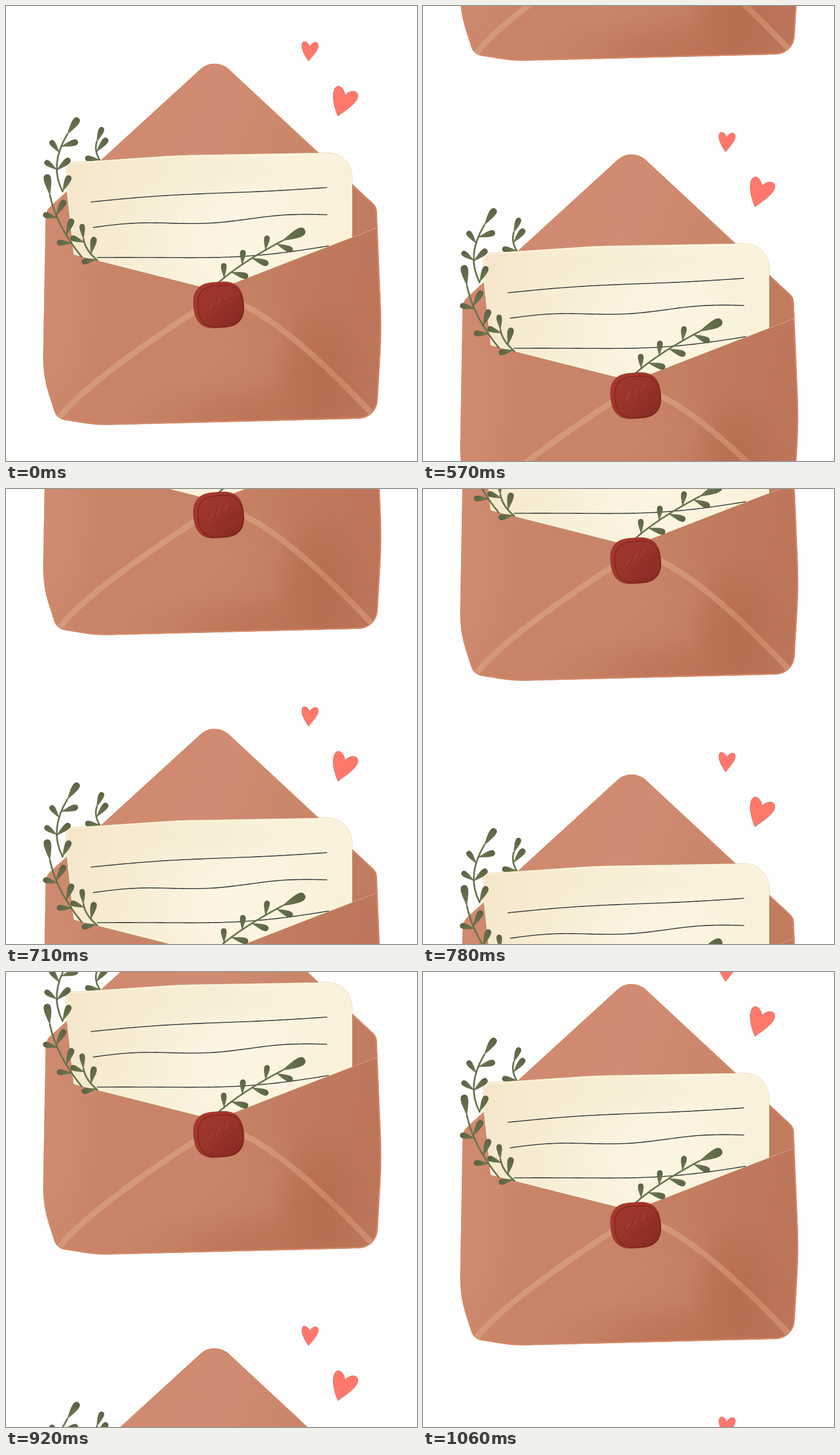
An HTML page with a canvas that plays this animation: 711 px wide and 787 px high, repeating every 1.13 s.

```html
<!DOCTYPE html>
<html lang="en">
<head>
<meta charset="utf-8">
<title>Love letter</title>
<style>
html, body { margin: 0; width: 100%; height: 100%; overflow: hidden; background: #fefefe; }
canvas { display: block; }
</style>
</head>
<body>
<canvas id="stage" width="711" height="787"></canvas>
<script>
const W = 711, H = 787, TAU = Math.PI * 2;
const HOLD = 500, STEP = 70, STEPS = 10;
const LOOP = HOLD + STEP * (STEPS - 1);

const stage = document.getElementById('stage').getContext('2d');
const art = document.createElement('canvas');
art.width = W;
art.height = H;
const g = art.getContext('2d');

function stroke(path, color, width) {
  g.strokeStyle = color;
  g.lineWidth = width;
  g.stroke(path);
}

function fill(path, color) {
  g.fillStyle = color;
  g.fill(path);
}

function clipped(path, draw) {
  g.save();
  g.clip(path);
  draw();
  g.restore();
}

function linear(x0, y0, x1, y1, ...colors) {
  const grad = g.createLinearGradient(x0, y0, x1, y1);
  colors.forEach((c, i) => grad.addColorStop(i / (colors.length - 1), c));
  return grad;
}

// Soft elliptical patch of colour; rgb is "r,g,b".
function glow(x, y, rx, ry, rgb, alpha) {
  g.save();
  g.translate(x, y);
  g.scale(rx, ry);
  const grad = g.createRadialGradient(0, 0, 0, 0, 0, 1);
  grad.addColorStop(0, `rgba(${rgb},${alpha})`);
  grad.addColorStop(0.5, `rgba(${rgb},${alpha * 0.6})`);
  grad.addColorStop(1, `rgba(${rgb},0)`);
  g.fillStyle = grad;
  g.fillRect(-1, -1, 2, 2);
  g.restore();
}

// Closed polygon whose [x, y, radius] corners are rounded.
function rounded(...corners) {
  const path = new Path2D();
  const [first, last] = [corners[0], corners.at(-1)];
  path.moveTo((first[0] + last[0]) / 2, (first[1] + last[1]) / 2);
  corners.forEach(([x, y, r = 0], i) => {
    const next = corners[(i + 1) % corners.length];
    path.arcTo(x, y, next[0], next[1], r);
  });
  path.closePath();
  return path;
}

function bend(x0, y0, cx, cy, x1, y1) {
  const path = new Path2D();
  path.moveTo(x0, y0);
  path.quadraticCurveTo(cx, cy, x1, y1);
  return path;
}

// Path sampled from a function of 0..1 that returns [x, y].
function plot(point, samples = 60) {
  const path = new Path2D();
  for (let i = 0; i <= samples; i++) path.lineTo(...point(i / samples));
  return path;
}

function heart(x, y, scale, tilt) {
  const shape = new Path2D();
  shape.bezierCurveTo(0, 0, 0, 0, 0, 0);
  shape.moveTo(0, 0);
  shape.bezierCurveTo(4, -9, 15, -11, 15, -1);
  shape.bezierCurveTo(15, 7, 4, 20, 0, 26);
  shape.bezierCurveTo(-4, 22, -14, 9, -14, -1);
  shape.bezierCurveTo(-14, -11, -4, -9, 0, 0);
  g.save();
  g.translate(x, y);
  g.rotate(tilt);
  g.scale(scale, scale);
  fill(shape, '#ff786b');
  stroke(shape, 'rgba(150,105,95,.5)', 0.6);
  g.restore();
}

function leaf(x, y, angle, length, width) {
  const shape = new Path2D(), w = width * 0.68;
  shape.moveTo(0, 0);
  shape.bezierCurveTo(length * 0.4, -w * 0.4, length, -w * 1.3, length, 0);
  shape.bezierCurveTo(length, w * 1.3, length * 0.4, w * 0.4, 0, 0);
  g.save();
  g.translate(x, y);
  g.rotate(angle);
  fill(shape, linear(0, 0, length, 0, '#6e7a53', '#5b6344'));
  stroke(shape, 'rgba(70,78,50,.6)', 0.8);
  g.restore();
}

// Bent stem with a leaf at its end and side leaves at the given fractions.
function sprig([x0, y0], [cx, cy], [x1, y1], tip, left, right) {
  const mix = (a, b, c, t) => a * (1 - t) ** 2 + 2 * b * t * (1 - t) + c * t * t;
  const slope = (a, b, c, t) => (b - a) * (1 - t) + (c - b) * t;
  const grow = (t, turn, length, width) => leaf(
    mix(x0, cx, x1, t), mix(y0, cy, y1, t),
    Math.atan2(slope(y0, cy, y1, t), slope(x0, cx, x1, t)) + turn, length, width);
  stroke(bend(x0, y0, cx, cy, x1, y1), '#69764f', 3);
  left.forEach(t => grow(t, -0.92, 25, 10));
  right.forEach(t => grow(t, 0.9, 30, 11));
  grow(1, 0.05, tip, tip * 0.37);
}

function drawEnvelope() {
  const body = rounded([361, 87, 36], [641, 347, 20], [650, 560, 800], [641, 713, 33],
    [158, 725, 200], [88, 714, 22], [64, 640, 200], [69, 354, 25]);
  fill(body, linear(64, 400, 650, 530, '#cf8a6f', '#c98468', '#c88468', '#c17a5d', '#bd755a'));
  clipped(body, () => {
    g.fillStyle = linear(250, 150, 500, 250, '#cf8a70', '#d08c72', '#c98669');
    g.fillRect(150, 80, 400, 190);
    glow(85, 540, 70, 170, '210,142,115', 0.6);
    glow(390, 590, 130, 110, '203,136,108', 0.5);
    glow(420, 720, 210, 75, '184,107,79', 0.45);
    glow(545, 635, 85, 130, '176,100,70', 0.5);
    fill(rounded([590, 290], [660, 350], [641, 384], [590, 404]), '#c17c60');
    stroke(body, '#d88a68', 4);
  });
  stroke(body, 'rgba(190,120,90,.5)', 0.7);
  g.lineCap = 'butt';
  stroke(bend(92, 712, 140, 650, 330, 526), '#d4997a', 10);
  stroke(bend(408, 516, 495, 558, 632, 704),
    linear(410, 520, 632, 704, '#d4997a', '#cf9071', '#c98565', '#cf8e6f'), 10);
  g.lineCap = 'round';
  stroke(bend(560, 415, 600, 400, 641, 384), '#dc9f82', 1.3);
}

// Hand-drawn rule: a straight line plus a few sine harmonics.
function inkLine(x0, y0, x1, y1, harmonics) {
  const point = t => [
    x0 + (x1 - x0) * t,
    harmonics.reduce((y, amp, i) => y + amp * Math.sin(Math.PI * (i + 1) * t), y0 + (y1 - y0) * t)
  ];
  stroke(plot(point), '#3b3e40', 1.6);
}

function drawLetter() {
  const sheet = rounded([104, 271, 10], [300, 258, 800], [599, 253, 43], [599, 400],
    [362, 492], [117, 430, 3], [104, 310, 60]);
  fill(sheet, linear(104, 290, 560, 420, '#f5e6ca', '#f8eed6', '#fbf3df', '#faf1db'));
  clipped(sheet, () => {
    glow(400, 400, 170, 110, '253,246,228', 0.7);
    glow(330, 285, 200, 45, '246,234,208', 0.5);
    stroke(sheet, 'rgba(255,246,218,.75)', 5);
  });
  stroke(sheet, 'rgba(165,145,105,.35)', 0.8);
  inkLine(147, 339, 555, 314, [-2.2, -1.5]);
  inkLine(151, 383, 555, 361, [0, 0, -3.5]);
  inkLine(158, 435, 558, 415, [10, -2]);
}

function blob(x, y, scale) {
  return plot(t => {
    const a = t * TAU;
    const r = scale * (43.5 + 2 * Math.cos(2 * a) + 2 * Math.cos(4 * a - 2.8));
    return [x + r * Math.cos(a), y + r * Math.sin(a)];
  });
}

function drawSeal() {
  const wax = blob(368, 517, 1), face = blob(371, 519, 0.9);
  fill(wax, linear(335, 485, 400, 550, '#a8372d', '#a2352b', '#8e2e26'));
  fill(face, linear(345, 490, 395, 550, '#9f372d', '#983329', '#892c25'));
  stroke(face, '#74221c', 1.1);
  clipped(face, () => {
    for (let i = 0; i < 5; i++) {
      const x = 358 + i * 9, y = 540 - i * 4;
      stroke(bend(x, y, x + 15, y - 13, x + 22, y - 32), 'rgba(105,30,26,.45)', 0.8);
    }
    for (let i = 0; i < 3; i++) {
      const x = 351 + i * 13, y = 525 - i * 8;
      stroke(bend(x, y, x + 4, y - 5, x + 6, y - 11), '#b65d50', 0.9);
    }
  });
  stroke(wax, 'rgba(120,35,28,.6)', 0.8);
}

function drawScene() {
  g.lineCap = g.lineJoin = 'round';
  g.fillStyle = '#fefefe';
  g.fillRect(0, 0, W, H);
  heart(525.5, 69.5, 1, 0.07);
  heart(586.5, 154, 1.48, 0.32);
  drawEnvelope();
  sprig([163, 268], [152, 250], [157, 235], 27, [0.05], [0.45]);
  drawLetter();
  sprig([98, 321], [74, 275], [106, 222], 34, [0.4, 0.7], [0, 0.39, 0.8]);
  sprig([131, 434], [87, 380], [76, 327], 36, [0.22, 0.63], [0.35, 0.67]);
  sprig([158, 440], [137, 422], [134, 403], 26, [0.05, 0.85], [0.3]);
  sprig([368, 478], [405, 445], [478, 406], 43, [0.12, 0.45, 0.79], [0.26, 0.6, 0.93]);
  drawSeal();
}

// Hold still, then scroll one tenth of the height per step, wrapping around.
function render(now) {
  const t = now % LOOP;
  const step = t < HOLD ? 0 : 1 + Math.floor((t - HOLD) / STEP);
  const y = Math.round(step * H / STEPS);
  stage.drawImage(art, 0, y);
  stage.drawImage(art, 0, y - H);
  requestAnimationFrame(render);
}

drawScene();
render(0);
</script>
</body>
</html>
```
